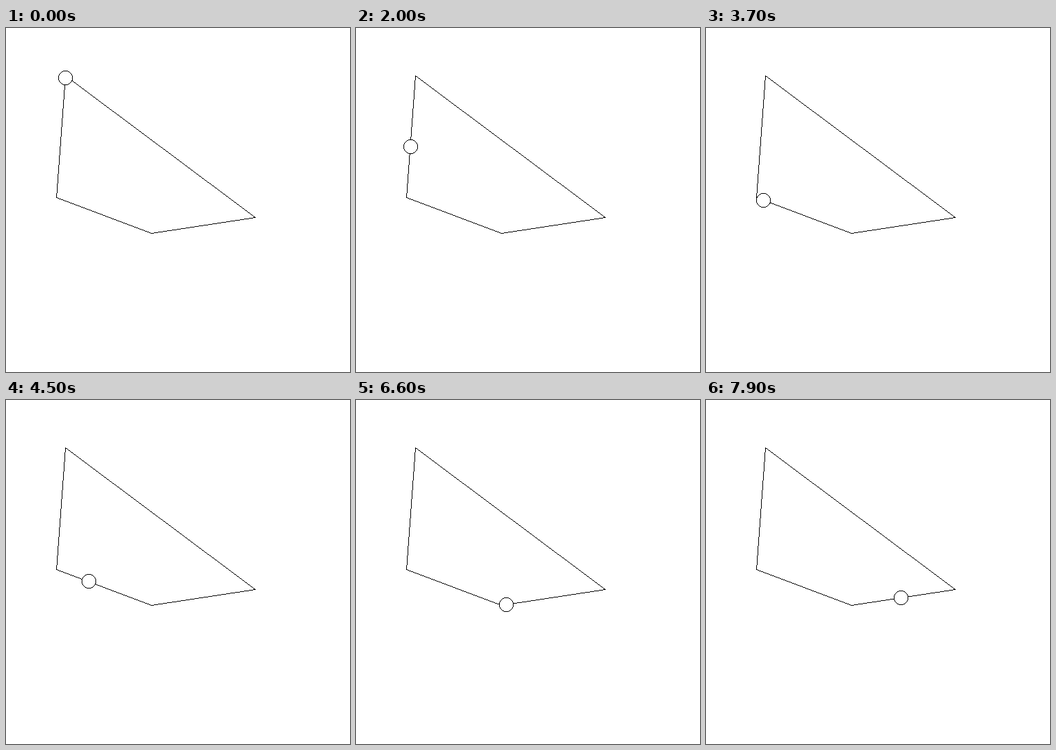
Animation of 500x500 px, one loop 8 s. Source, as an HTML page with a canvas:

```html
<!DOCTYPE html>
<html lang="en">
<head>
<meta charset="utf-8">
<title>Circle on a path</title>
<style>
html, body { margin: 0; width: 100%; height: 100%; overflow: hidden; background: #fff; }
canvas { display: block; }
</style>
</head>
<body>
<canvas id="stage" width="500" height="500"></canvas>
<script>
const ctx = document.getElementById('stage').getContext('2d');
const STEP = 100, STEPS = 80, R = 10;
const corners = [[86, 69], [73, 246], [211, 298], [362, 275]];

// Constant-speed legs: first step, position there, movement per step
const legs = [
  { from: 0, x: 86, y: 72.1, dx: -0.366, dy: 4.986 },
  { from: 36, x: 78, y: 247.8, dx: 4.68, dy: 1.74 },
  { from: 65, x: 213.41, y: 297.45, dx: 4.943, dy: -0.753 }
];

const dot = (x, y) => ctx.fillRect(Math.round(x), Math.round(y), 1, 1);
const halfChord = i => Math.round(Math.sqrt(R * R - i * i));

function line([x1, y1], [x2, y2]) {
  const n = Math.max(Math.abs(x2 - x1), Math.abs(y2 - y1));
  for (let i = 0; i <= n; i++) dot(x1 + (x2 - x1) * i / n, y1 + (y2 - y1) * i / n);
}

function circle(x, y) {
  ctx.fillStyle = '#fff';
  for (let i = -R; i <= R; i++) {
    const w = halfChord(i);
    ctx.fillRect(x - w, y + i, 2 * w + 1, 1);
  }
  ctx.fillStyle = '#000';
  for (let i = -7; i <= 7; i++) {
    const w = halfChord(i);
    for (const s of [-w, w]) {
      dot(x + i, y + s);
      dot(x + s, y + i);
    }
  }
}

function draw(step) {
  ctx.fillStyle = '#fff';
  ctx.fillRect(0, 0, 500, 500);
  ctx.fillStyle = '#000';
  corners.forEach((p, i) => line(p, corners[(i + 1) % corners.length]));
  const leg = legs.filter(l => l.from <= step).pop();
  const k = step - leg.from;
  circle(Math.round(leg.x + leg.dx * k), Math.round(leg.y + leg.dy * k));
}

const start = performance.now();
function tick() {
  draw(Math.floor((performance.now() - start) / STEP) % STEPS);
  requestAnimationFrame(tick);
}
tick();
</script>
</body>
</html>
```
